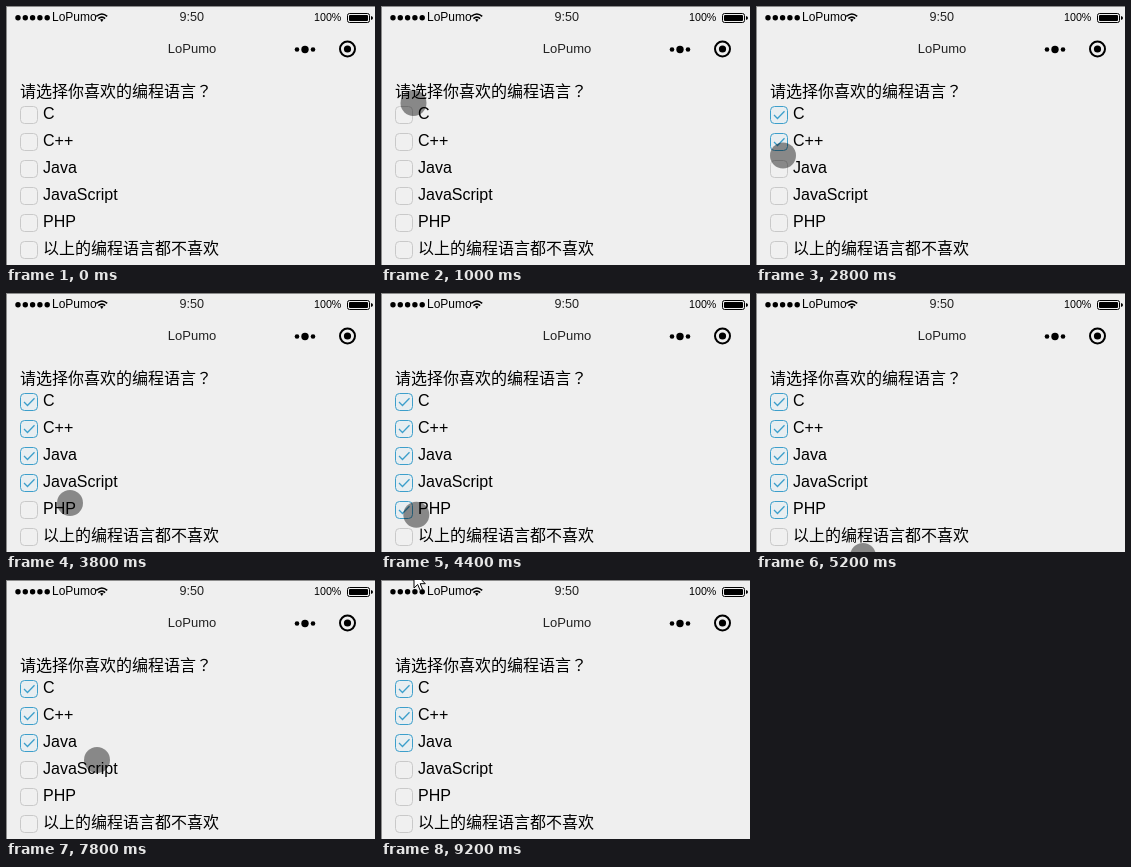
Animation, 369 px wide and 259 px high, one loop 9.4 s. Source, as an HTML page:

```html
<!DOCTYPE html>
<html lang="zh-CN">
<head>
<meta charset="utf-8">
<title>Checkbox demo</title>
<style>
  html, body { margin: 0; width: 100%; height: 100%; overflow: hidden; background: #efefef; }
  svg { display: block; width: 369px; height: 259px; }
  text { font-family: "Liberation Sans", Arial, "Noto Sans CJK SC", "Noto Sans CJK", sans-serif; font-weight: 350; fill: #000; }
  .centered { font-family: "Noto Sans CJK JP", sans-serif; }
  .bar { fill: #222; }
  .box { fill: #f0f0f0; stroke: #c9c9c9; }
  .tick { fill: none; stroke: #3d9fcb; stroke-width: 1.3; visibility: hidden; }
  .on .box { fill: #e8eef1; stroke: #3d9fcb; }
  .on .tick { visibility: visible; }
</style>
</head>
<body>
<svg viewBox="0 0 369 259">
  <rect width="369" height="259" fill="#efefef"/>
  <path d="M0 .5H369M.5 0V259" stroke="#8c8c8c"/>

  <g id="signal"></g>
  <text x="46" y="15" font-size="12">LoPumo</text>
  <g fill="none" stroke="#000" stroke-width="1.6">
    <path d="M90.3 10.3Q96 5.7 101.2 10.3M92.4 12.6Q96 9.6 99.1 12.6"/>
    <path d="M94 13.6Q95.8 12.4 97.5 13.6L95.8 16Z" fill="#000" stroke="none"/>
  </g>
  <text class="bar" x="185.8" y="15" font-size="12.6" text-anchor="middle">9:50</text>
  <text x="308" y="15" font-size="10.7">100%</text>
  <rect x="341.5" y="7.5" width="22" height="9" rx="2" fill="none" stroke="#000"/>
  <rect x="343" y="9" width="19" height="6" rx="1"/>
  <path d="M365 10Q367 10.5 367 12T365 14Z"/>

  <text class="bar" x="186" y="47" font-size="13" text-anchor="middle">LoPumo</text>
  <circle cx="291" cy="43.5" r="2.3"/>
  <circle cx="299" cy="43.5" r="3.7"/>
  <circle cx="307" cy="43.5" r="2.3"/>
  <circle cx="341.5" cy="43" r="7.5" fill="none" stroke="#000" stroke-width="2"/>
  <circle cx="341.5" cy="43" r="3.6"/>

  <text x="14" y="91" font-size="16">请选择你喜欢的编程语言<tspan class="centered" lang="ja">？</tspan></text>
  <g id="options"></g>

  <circle id="touch" r="13" fill="#000" fill-opacity=".43"/>
  <path id="arrow" d="M0 0V16L3.7 12.5L6.2 18.4L8.6 17.4L6.2 11.7H11.3Z" fill="#fff" stroke="#000"/>
</svg>
<script>
const LOOP = 9400, STEP = 200, ROW = 27;
const byId = id => document.getElementById(id);
const labels = ["C", "C++", "Java", "JavaScript", "PHP", "以上的编程语言都不喜欢"];
const NONE = labels.length - 1;

byId("signal").innerHTML = [0, 1, 2, 3, 4]
  .map(i => `<circle cx="${12 + 7.3 * i}" cy="11.8" r="2.7"/>`).join("");

byId("options").innerHTML = labels.map((label, i) => `
  <g transform="translate(14 ${100 + ROW * i})">
    <rect class="box" x=".5" y=".5" width="17" height="17" rx="4"/>
    <path class="tick" d="M4 9L7.5 12.5L14.5 5.3"/>
    <text x="23" y="13" font-size="16">${label}</text>
  </g>`).join("");
const options = [...byId("options").children];

const at = (time, x, y) => ({ time, x, y });
const click = (time, label) => {
  const row = labels.indexOf(label);
  return { time, row, x: 27, y: 109 + ROW * row };
};

// Visits of the pointer: an arrow above the page, a touch spot on it.
const visits = [
  { shape: "arrow", path: [at(400, 52, -4), at(600, 47, 40)] },
  { shape: "touch", path: [
    at(800, 38, 85), click(1200, "C"), at(1800, 64, 164), click(2600, "C++"),
    click(3000, "Java"), click(3400, "JavaScript"), at(3800, 64, 210),
    click(4200, "PHP"), at(5200, 107, 263)] },
  { shape: "touch", path: [
    at(5800, 106, 257), click(6000, labels[NONE]), click(6200, "C"), at(6400, 65, 123),
    click(7000, "C++"), click(7400, "Java"), at(7800, 91, 180), at(8000, 101, 151)] },
  { shape: "arrow", path: [at(8800, 52, -4), at(9200, 33, -8)] }
];
const clicks = visits.flatMap(visit => visit.path).filter(key => "row" in key);

const ease = p => p * p * (3 - 2 * p);
const mix = (a, b, p) => a + (b - a) * p;

function position(path, time) {
  const next = path.findIndex(key => key.time >= time);
  if (next < 0 || time < path[0].time) return null;
  const b = path[next], a = path[next - 1] || b;
  const p = a === b ? 1 : ease((time - a.time) / (b.time - a.time));
  return [mix(a.x, b.x, p), mix(a.y, b.y, p)];
}

// The last option and the others exclude each other.
function selection(time) {
  let chosen = [];
  for (const { row } of clicks.filter(key => key.time <= time)) {
    chosen = row === NONE ? [NONE] : [...chosen.filter(i => i !== NONE), row];
  }
  return chosen;
}

function draw(time) {
  for (const shape of ["touch", "arrow"]) {
    const pos = visits.filter(visit => visit.shape === shape)
      .map(visit => position(visit.path, time)).find(Boolean);
    byId(shape).style.visibility = pos ? "visible" : "hidden";
    if (pos) byId(shape).setAttribute("transform", `translate(${pos})`);
  }
  const chosen = selection(time);
  options.forEach((el, i) => el.classList.toggle("on", chosen.includes(i)));
}

const origin = performance.now();
function tick() {
  const time = (performance.now() - origin) % LOOP;
  draw(Math.floor(time / STEP) * STEP);
  requestAnimationFrame(tick);
}
tick();
</script>
</body>
</html>
```
